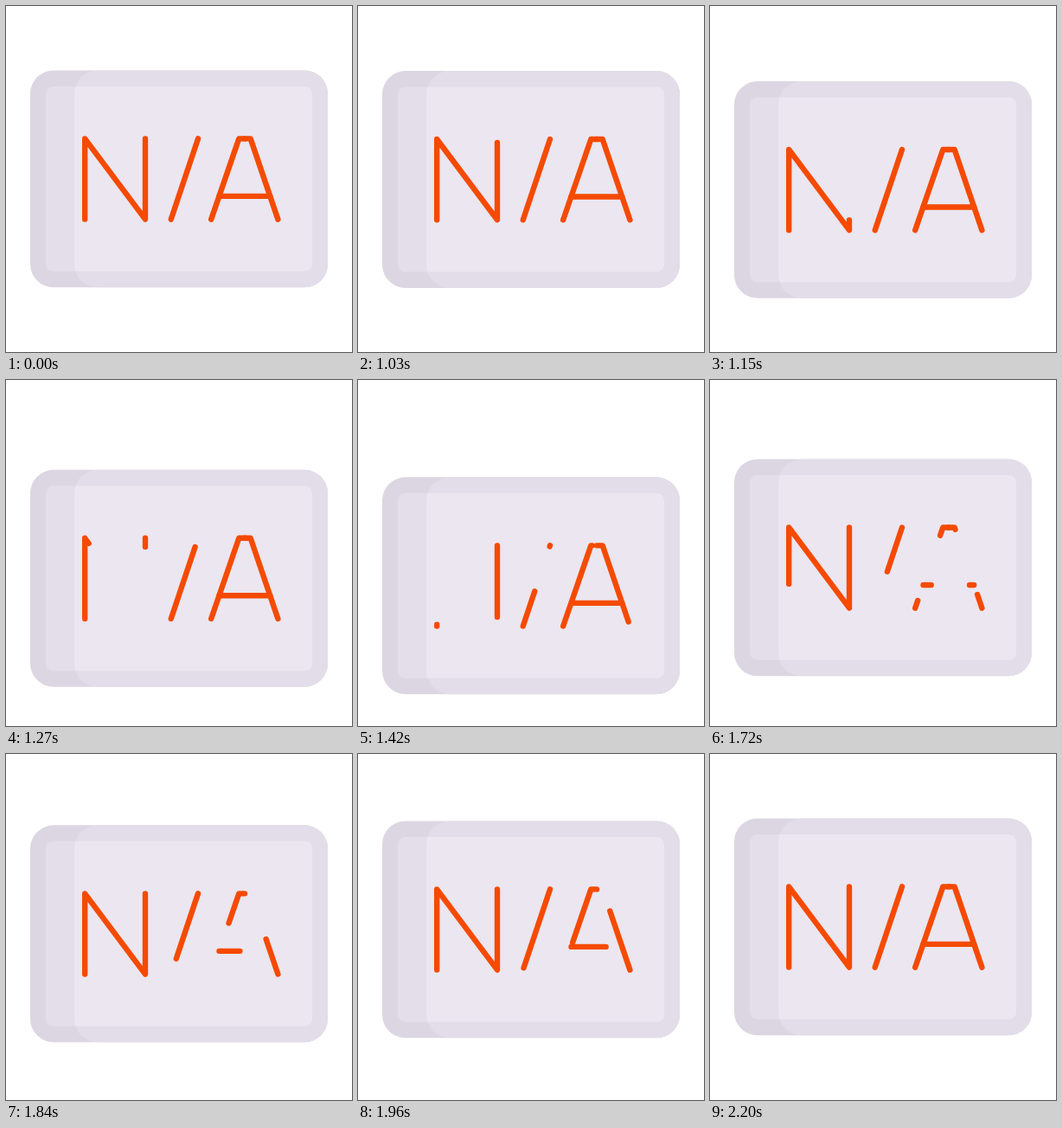
An HTML page that plays this animation: 400x400 px, repeating every 2230 ms.

```html
<!DOCTYPE html>
<html lang="en">
<head>
<meta charset="utf-8">
<title>N/A card</title>
<style>
  html, body { margin: 0; width: 100%; height: 100%; overflow: hidden; background: #fff; }
  svg { display: block; width: 100%; height: 100%; }
</style>
</head>
<body>
<svg viewBox="0 0 400 400">
  <defs>
    <clipPath id="front"><rect x="79" y="74.4" width="293" height="250.9" rx="27"/></clipPath>
  </defs>
  <g id="card">
    <rect x="28" y="74.4" width="344" height="250.9" rx="27" fill="#dcd6e2"/>
    <rect x="46" y="92.9" width="308" height="213.9" rx="8.5" fill="#e3dee9"/>
    <g clip-path="url(#front)">
      <rect x="79" y="74" width="293" height="252" fill="#e2dde8"/>
      <rect x="46" y="92.9" width="308" height="213.9" rx="8.5" fill="#ebe6f0"/>
    </g>
    <g id="ink" fill="none" stroke="#f54a00" stroke-width="6.4" stroke-linecap="round" stroke-linejoin="round"></g>
  </g>
</svg>
<script>
const LOOP = 2230, STEP = 30, PEAK = 38;
const card = document.getElementById('card');
const ink = document.getElementById('ink');

// Each stroke is wiped from its end, then redrawn from its end.
const strokes = [
  ['M91.2 246.6V153.4L161 246.6V153.4', 1000],
  ['M190.8 246.6L222 153.4', 1180],
  ['M237.2 246.6L269.3 153.4H276', 1360],
  ['M276 153.4H282.7L314.4 246.6', 1360],
  ['M305.2 219.9H246.5', 1360]
].map(([d, start]) => ({ start, head: addPath(d), tail: addPath(d) }));

function addPath(d) {
  const p = document.createElementNS('http://www.w3.org/2000/svg', 'path');
  p.setAttribute('d', d);
  p.setAttribute('pathLength', 1);
  ink.appendChild(p);
  return p;
}

const progress = (t, start, length) => Math.min(1, Math.max(0, (t - start) / length));
const smooth = u => u * u * (3 - 2 * u);

// Cubic bezier easing with control points (x1, 0) and (x2, 1).
function ease(u, x1, x2) {
  let lo = 0, hi = 1;
  for (let i = 0; i < 30; i++) {
    const s = (lo + hi) / 2, r = 1 - s;
    if (3 * r * r * s * x1 + 3 * r * s * s * x2 + s * s * s < u) lo = s; else hi = s;
  }
  return smooth(hi);
}

function showPart(path, from, to) {
  const size = to - from;
  path.style.display = size > 0 ? '' : 'none';
  path.setAttribute('stroke-dasharray', `${size} 2`);
  path.setAttribute('stroke-dashoffset', -from);
}

function draw(ms) {
  const t = Math.floor((ms - 10) / STEP) * STEP + 10;
  const down = smooth(progress(t, 1000, 390));
  const up = ease(progress(t, 1400, 800), 0.367, 0.3);
  card.setAttribute('transform', `translate(0 ${PEAK * (down - up)})`);
  for (const { start, head, tail } of strokes) {
    showPart(head, 0, 1 - smooth(progress(t, start, 440)));
    showPart(tail, 1 - smooth(progress(t, start + 200, 640)), 1);
  }
}

const begin = performance.now();
function tick() {
  draw((performance.now() - begin) % LOOP);
  requestAnimationFrame(tick);
}
tick();
</script>
</body>
</html>
```
